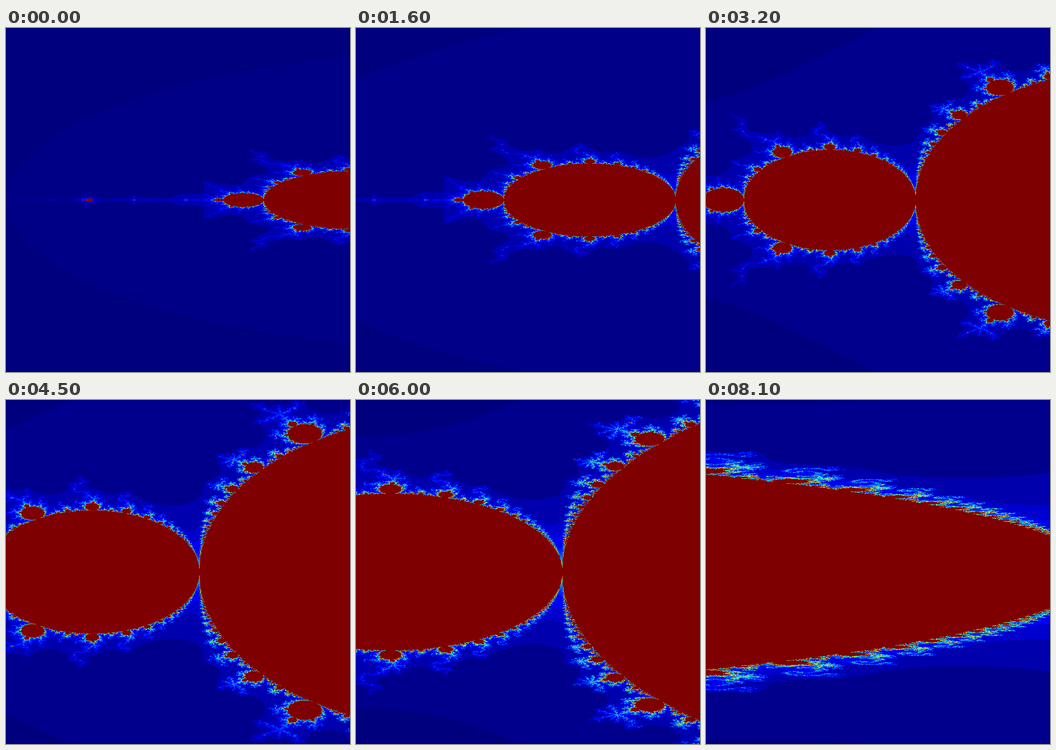
An HTML page with a canvas for the animation above (8200 ms loop, 748 px wide and 748 px high).

```html
<!DOCTYPE html>
<html lang="en">
<head>
<meta charset="utf-8">
<title>Mandelbrot zoom</title>
<style>
html, body { margin: 0; width: 100%; height: 100%; overflow: hidden; background: #00007f; }
canvas { display: block; width: 100vw; height: 100vh; image-rendering: pixelated; }
</style>
</head>
<body>
<canvas id="view" width="748" height="748"></canvas>
<script>
const SIZE = 748, HALF = SIZE / 2, LAST = SIZE - 1;
const STEPS = 82, STEP_MS = 100, MAX = 256, TURN = 35;
const ctx = document.getElementById('view').getContext('2d');
const image = ctx.createImageData(SIZE, SIZE);
const pixels = new Uint32Array(image.data.buffer);
const counts = new Uint16Array(SIZE * HALF);

// Piecewise linear ramp through [position, value] stops
function ramp(stops, t) {
  for (let i = 1; i < stops.length; i++) {
    const [a, u] = stops[i - 1], [b, v] = stops[i];
    if (t <= b) return u + (v - u) * (t - a) / (b - a);
  }
  return stops[stops.length - 1][1];
}

const RED = [[0, 0], [0.35, 0], [0.66, 1], [0.89, 1], [1, 0.5]];
const GREEN = [[0, 0], [0.125, 0], [0.375, 1], [0.64, 1], [0.91, 0], [1, 0]];
const BLUE = [[0, 0.5], [0.11, 1], [0.34, 1], [0.65, 0], [1, 0]];
const jet = Array.from({ length: 256 }, (_, i) =>
  [RED, GREEN, BLUE].map(stops => Math.floor(ramp(stops, i / 255) * 255 + 1e-6)));

// Pan right while narrowing the height, then close in from all sides
function windowAt(k) {
  const pan = Math.min(k, TURN), zoom = Math.max(0, k - TURN);
  return {
    left: -2 + 0.02 * pan + 0.01 * zoom,
    width: 1 - 0.02 * zoom,
    height: 3 - 0.04 * pan - 0.02 * zoom
  };
}

function escapeCount(cx, cy) {
  const y2 = cy * cy, p = cx - 0.25, q = p * p + y2;
  if (q * (q + p) <= 0.25 * y2) return MAX;
  if ((cx + 1) * (cx + 1) + y2 <= 0.0625) return MAX;
  let x = cx, y = cy, xx = x * x, yy = y * y;
  for (let i = 0; i < MAX; i++) {
    y = 2 * x * y + cy;
    x = xx - yy + cx;
    xx = x * x;
    yy = y * y;
    if (xx + yy > 4) return i;
  }
  return MAX;
}

// Colours sharing a coarse RGB cell are merged into their mean
function makePalette(hist, min, max) {
  const cells = new Map(), cellOf = [];
  for (let n = min; n <= max; n++) {
    const i = Math.min(255, Math.floor((n - min) / (max - min) * 256));
    const [r, g, b] = jet[i];
    const key = (r >> 5) << 8 | (g >> 4) << 4 | b >> 5;
    if (!cells.has(key)) cells.set(key, [0, 0, 0, 0]);
    const cell = cellOf[n] = cells.get(key), h = hist[n];
    cell[0] += r * h;
    cell[1] += g * h;
    cell[2] += b * h;
    cell[3] += h;
  }
  return cellOf.map(([r, g, b, total]) => {
    const mean = v => Math.floor(v / (total || 1));
    return (255 << 24 | mean(b) << 16 | mean(g) << 8 | mean(r)) >>> 0;
  });
}

// The first and last samples lie exactly on the window's edges
function draw(k) {
  const { left, width, height } = windowAt(k);
  const hist = new Uint32Array(MAX + 1);
  for (let row = 0, at = 0; row < HALF; row++) {
    const cy = (0.5 - row / LAST) * height;
    for (let col = 0; col < SIZE; col++) {
      const n = escapeCount(left + col / LAST * width, cy);
      counts[at++] = n;
      hist[n]++;
    }
  }
  const min = hist.findIndex(h => h > 0);
  const palette = makePalette(hist, min, MAX);
  for (let row = 0, at = 0; row < HALF; row++) {
    const mirror = (LAST - row) * SIZE;
    for (let col = 0; col < SIZE; col++, at++) {
      pixels[at] = pixels[mirror + col] = palette[counts[at]];
    }
  }
  ctx.putImageData(image, 0, 0);
}

const start = performance.now();
let shown = -1;
function tick(now) {
  const k = Math.floor(Math.max(0, now - start) / STEP_MS) % STEPS;
  if (k !== shown) draw(shown = k);
  requestAnimationFrame(tick);
}
tick(start);
</script>
</body>
</html>
```
